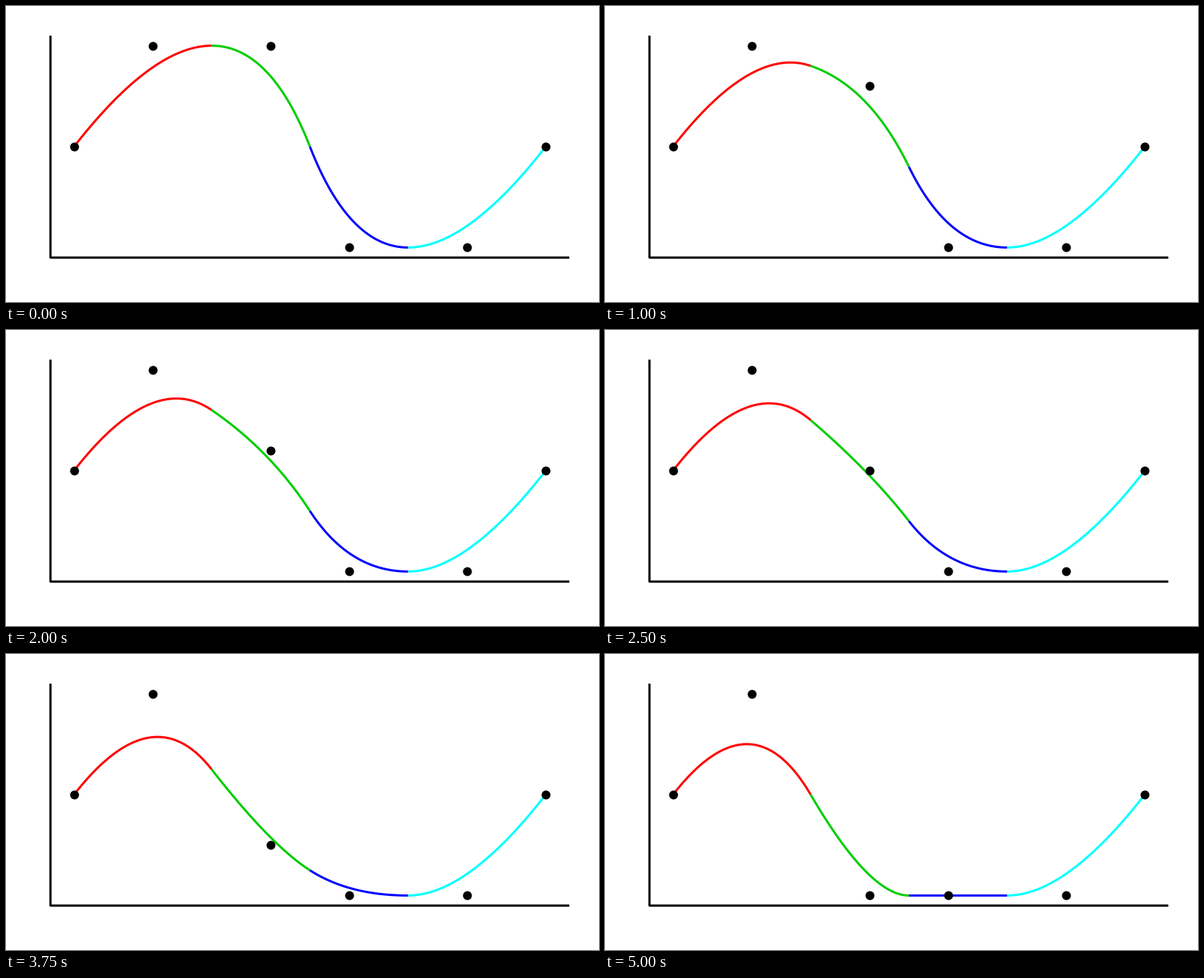
These frames come from a looping animation (800x400 px, 5250 ms). A matplotlib script:

```python
import numpy as np
import matplotlib.pyplot as plt
from matplotlib.animation import FuncAnimation

FRAMES = 21
INTERVAL = 250
DPI = 100
PX = 72 / DPI  # points per pixel

COLORS = ["#ff0000", "#00cd00", "#0000ff", "#00ffff"]
KNOT_X = [0, 1, 2.5, 3.5, 5, 6]
T = np.linspace(0, 1, 101)[:, None]


def control_points(i):
    """The third control point sinks from +1 to -1 at constant speed."""
    y = [0, 1, 1 - 2 * i / (FRAMES - 1), -1, -1, 0]
    return np.column_stack([KNOT_X, y])


def bezier(a, b, c):
    return (1 - T) ** 2 * a + 2 * T * (1 - T) * b + T ** 2 * c


def spline(p):
    """Quadratic B-spline pieces, joined at midpoints of the inner legs."""
    mids = (p[1:-2] + p[2:-1]) / 2
    ends = np.vstack([p[:1], mids, p[-1:]])
    return [bezier(ends[k], p[k + 1], ends[k + 1]) for k in range(4)]


fig = plt.figure(figsize=(8, 4), dpi=DPI, facecolor="white")
ax = fig.add_axes([60 / 800, 60 / 400, 700 / 800, 300 / 400])
ax.set_xlim(-0.3, 6.3)
ax.set_ylim(-1.1, 1.1)
ax.axis("off")

stroke = dict(lw=3 * PX, snap=False, solid_capstyle="butt",
              solid_joinstyle="round")
ax.plot([0, 0, 1], [1, 0, 0], color="black", transform=ax.transAxes,
        clip_on=False, **stroke)
curves = [ax.plot([], [], color=c, **stroke)[0] for c in COLORS]
dots, = ax.plot([], [], "o", color="black", ms=12 * PX, mew=0,
                snap=False, zorder=5)


def update(i):
    p = control_points(i)
    for curve, piece in zip(curves, spline(p)):
        curve.set_data(piece[:, 0], piece[:, 1])
    dots.set_data(p[:, 0], p[:, 1])
    return [*curves, dots]


anim = FuncAnimation(fig, update, frames=FRAMES, init_func=lambda: update(0),
                     interval=INTERVAL, repeat=True, repeat_delay=0)
plt.show()
```
